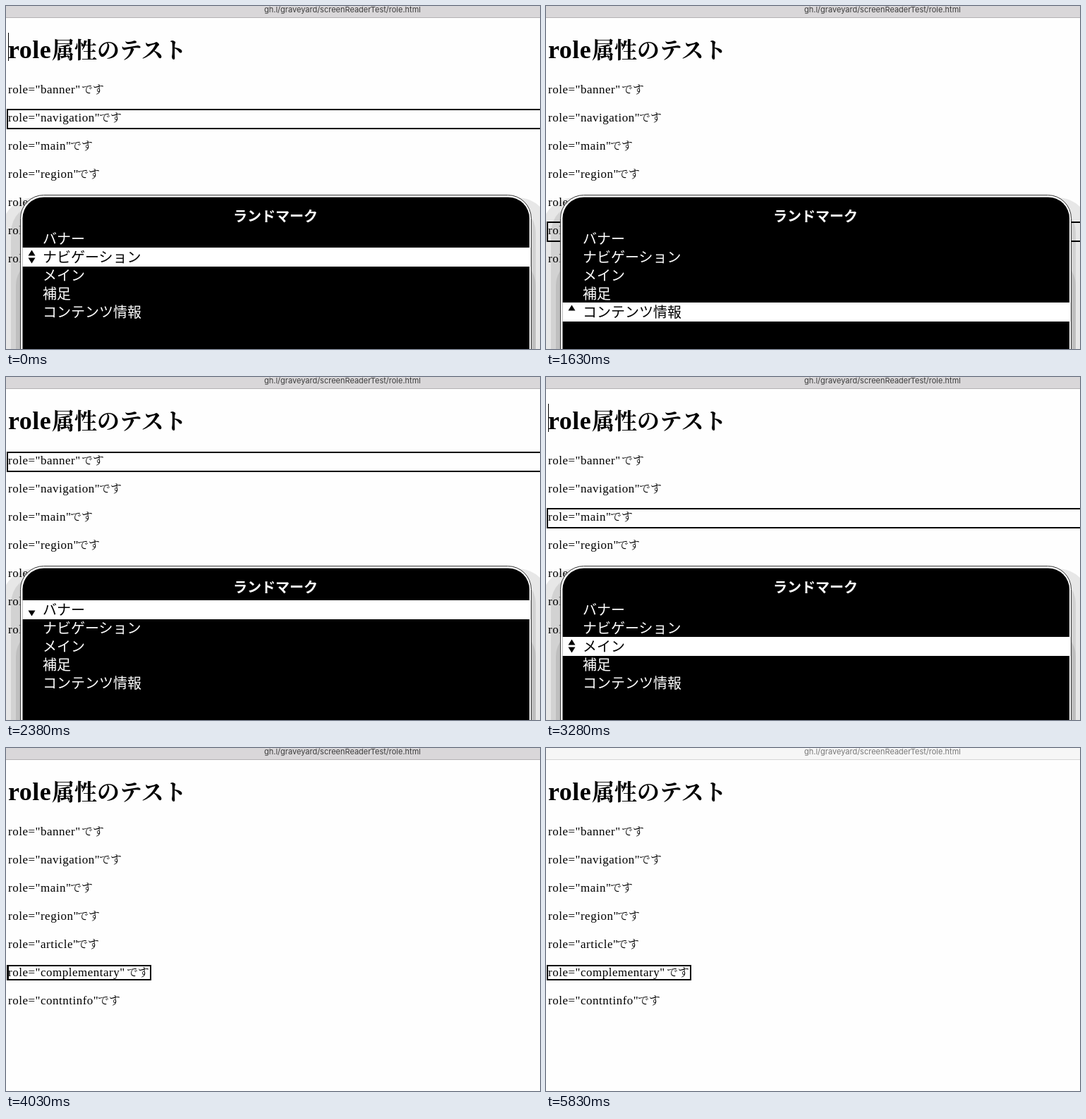
Write an HTML page that moves like this. It is 757 px wide and 487 px high and loops after 5870 ms.

```html
<!DOCTYPE html>
<html lang="ja">
<head>
<meta charset="utf-8">
<title>role</title>
<style>
  html, body { margin: 0; width: 100%; height: 100%; overflow: hidden; background: #fefefe; }
  svg { display: block; }
  .address { font: 11px Inter, sans-serif; text-anchor: middle; }
  .latin { font: 17px "Liberation Serif", serif; letter-spacing: .5px; }
  .kana { font: 16px "Noto Serif CJK JP", "Noto Sans CJK JP", "Noto Sans CJK", serif; }
  .heading.latin { font-size: 36px; font-weight: bold; }
  .heading.kana { font-size: 32px; font-weight: bold; }
  .menu { font: 20px "Noto Sans CJK JP", "Noto Sans CJK", sans-serif; fill: #fff; }
  .menu .title { font-weight: bold; text-anchor: middle; }
  .focus { fill: none; stroke: #000; stroke-width: 2; }
</style>
</head>
<body>
<svg width="757" height="487" viewBox="0 0 757 487">
  <rect id="bar" width="757" height="16"/>
  <rect id="barEdge" y="16" width="757" height="1"/>
  <text id="address" class="address" x="477" y="9">gh.l/graveyard/screenReaderTest/role.html</text>

  <text class="heading latin" x="3" y="74">role</text>
  <text class="heading kana" x="65" y="74">属性のテスト</text>
  <g id="paragraphs"></g>
  <rect id="focus" class="focus"/>
  <rect id="caret" x="3" width="1"/>

  <g id="panel" class="menu">
    <g fill="#000" fill-opacity=".09">
      <rect x="-6" y="272" width="777" height="300" rx="46"/>
      <rect x="7" y="280" width="744" height="300" rx="42"/>
      <rect x="14" y="360" width="737" height="300" rx="36"/>
    </g>
    <rect x="20.5" y="268.5" width="724" height="300" rx="33" fill="#fff" stroke="#333"/>
    <rect x="23.5" y="271.5" width="718.5" height="300" rx="30" fill="#000"/>
    <text class="title" x="382" y="305.5">ランドマーク</text>
    <rect id="highlight" x="23.5" width="718.5" height="27"/>
    <g id="items"></g>
    <path id="up" fill="#000" d="M36.5 -9.5l5 8h-10z"/>
    <path id="down" fill="#000" d="M36.5 9.5l5 -8h-10z"/>
  </g>
</svg>
<script>
const LOOP = 5870, CLOSE = 4030, BLUR = 5830;

// role name and where the Japanese ending begins
const paragraphs = [
  ['banner', 107], ['navigation', 132], ['main', 91], ['region', 101],
  ['article', 100], ['complementary', 171], ['contntinfo', 130]
];
// menu label and the paragraph it points to
const landmarks = [
  ['バナー', 0], ['ナビゲーション', 1], ['メイン', 2], ['補足', 5], ['コンテンツ情報', 6]
];
// time, selected menu item, outlined landmark
const moves = [
  [0, 1, 1], [300, 2, 2], [590, 3, 3], [1040, 4, 4], [1630, 4, 3], [1780, 3, 3],
  [1930, 2, 2], [2080, 1, 1], [2380, 0, 0], [2980, 1, 1], [3280, 2, 2], [3580, 3, 3]
];
const caretToggles = [450, 890, 1340, 1930, 2380, 2830, 3430, 3880, 4480, 5080, 5530];

const el = id => document.getElementById(id);
const set = (id, attrs) => {
  for (const name in attrs) el(id).setAttribute(name, attrs[name]);
};
const show = (id, visible) => set(id, { visibility: visible ? 'inherit' : 'hidden' });

el('paragraphs').innerHTML = paragraphs.map(([role, x], i) => {
  const y = 124 + 40 * i;
  return `<text class="latin" x="3" y="${y}">role="${role}"</text>
          <text class="kana" x="${x}" y="${y}">です</text>`;
}).join('');
el('items').innerHTML = landmarks.map(([label], i) =>
  `<text x="52" y="${337.5 + 26 * i}">${label}</text>`).join('');

function draw(t) {
  const open = t < CLOSE, active = t < BLUR;
  const [, item, landmark] = moves.findLast(move => move[0] <= t);

  set('bar', { fill: active ? '#d9d7d9' : '#f6f6f6' });
  set('barEdge', { fill: active ? '#b3b1b3' : '#d5d5d5' });
  set('address', { fill: active ? '#3c3c3c' : '#777' });

  show('caret', caretToggles.filter(time => time <= t).length % 2 === 0);
  set('caret', open ? { y: 38, height: 40 } : { y: 310, height: 18 });
  set('focus', open
    ? { x: 2, y: 107 + 40 * landmarks[landmark][1], width: 770, height: 27 }
    : { x: 2, y: 309, width: 203, height: 20 });

  el('panel').style.display = open ? '' : 'none';
  set('highlight', { y: 317 + 26 * item });
  [...el('items').children].forEach((text, i) =>
    text.setAttribute('fill', i === item ? '#000' : '#fff'));
  const transform = `translate(0 ${356 + 26 * (item - 1)})`;
  set('up', { transform });
  set('down', { transform });
  show('up', item > 0);
  show('down', item < landmarks.length - 1);
}

const start = performance.now();
function tick() {
  draw((performance.now() - start) % LOOP);
  requestAnimationFrame(tick);
}
tick();
</script>
</body>
</html>
```
